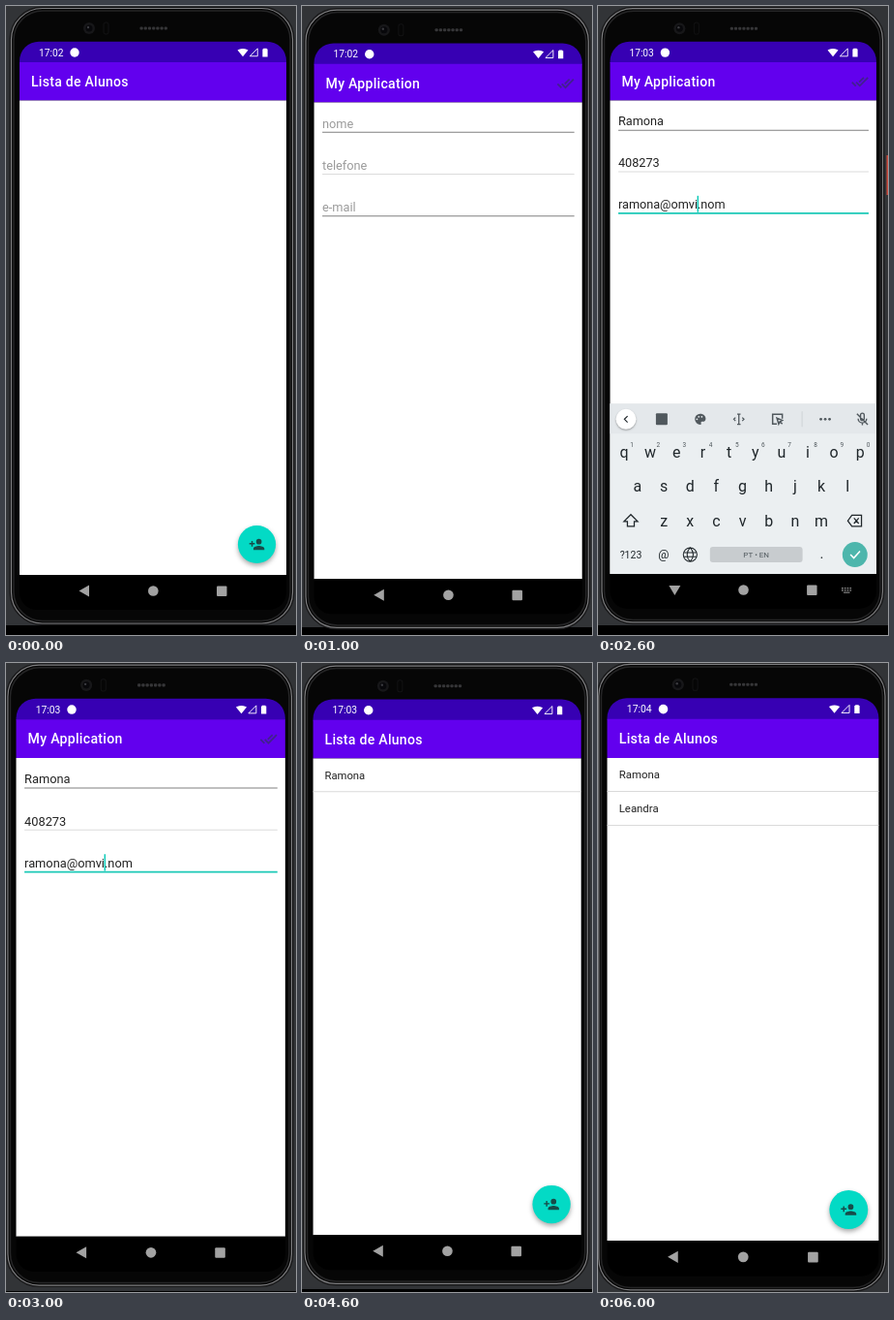
Animation of 300x649 px, one loop 7000 ms. Source, as an HTML page with a canvas:

```html
<!DOCTYPE html>
<html lang="pt">
<head>
<meta charset="utf-8">
<style>
html, body { margin: 0; height: 100%; overflow: hidden; background: #000; }
canvas { display: block; width: 300px; height: 649px; }
</style>
</head>
<body>
<canvas id="stage"></canvas>
<script>
const canvas = document.getElementById('stage');
const ctx = canvas.getContext('2d');
const ratio = window.devicePixelRatio || 1;
canvas.width = 300 * ratio;
canvas.height = 649 * ratio;

// left/top: corner of the page below the app bar; floor: where the desktop turns black
const scenes = [
  { left: 14, top: 97, scale: 1, floor: 639, time: '17:02', names: [] },
  { left: 12.5, top: 99, scale: 1.0045, floor: 641, time: '17:02' },
  { left: 12.5, top: 97, scale: .998, floor: 639, time: '17:03', filled: true, keyboard: true },
  { left: 10.5, top: 97.5, scale: 1.0085, floor: 648, time: '17:03', filled: true },
  { left: 11.5, top: 98, scale: 1.0045, floor: 646, time: '17:03', names: ['Ramona'] },
  { left: 13.5, top: 100, scale: .998, floor: 643, time: '17:04', names: ['Ramona', 'Leandra', 'Bruno'], menu: true },
  { left: 9.5, top: 97.5, scale: 1.0175, floor: 649, time: '17:04', names: ['Ramona', 'Leandra'] },
];
const hints = ['nome', 'telefone', 'e-mail'];
const values = ['Ramona', '408273', 'ramona@omvi.nom'];

const icons = {
  addPerson: 'M15 12a4 4 0 1 0 0-8 4 4 0 0 0 0 8zM6 10V7H4v3H1v2h3v3h2v-3h3v-2zM15 14c-2.7 0-8 1.3-8 4v2h16v-2c0-2.7-5.3-4-8-4z',
  wifi: 'M12 21 24 6.5C23.5 6 18.8 3 12 3S.5 6 0 6.5z',
  signal: 'M2 21H21V2z',
  battery: 'M8 4V2h8v2h2v18H6V4z',
  check: 'M4 12l6 6L21 6',
  doubleCheck: 'M1 12.7l5.3 5.3M6.8 12.7l5 5L23 6.3M17.3 6.3l-6.4 6.3',
  chevron: 'M15 6l-6 6 6 6',
  palette: 'M12 3a9 9 0 0 0 0 18c1 0 1.8-1 1.4-2-.8-1.4 0-3 1.6-3h1a5 5 0 0 0 5-5c0-4.4-4-8-9-8zM5 12a1.5 1.5 0 1 0 3 0 1.5 1.5 0 1 0-3 0M8 8a1.5 1.5 0 1 0 3 0 1.5 1.5 0 1 0-3 0M13 8a1.5 1.5 0 1 0 3 0 1.5 1.5 0 1 0-3 0',
  textCursor: 'M9 3h6M12 3v18M9 21h6M6 9l-3 3 3 3M18 9l3 3-3 3',
  touch: 'M20 11V4H4v16h7M11 10l9 4-4 2-2 4zM16 16l4 4',
  mic: 'M9 5a3 3 0 0 1 6 0v6a3 3 0 0 1-6 0zM5 11a7 7 0 0 0 14 0M12 18v4M3 3l18 18',
  shift: 'M12 3 2 13h5v7h10v-7h5z',
  erase: 'M8 4h14v16H8L2 12zM11 8l7 8M18 8l-7 8',
  globe: 'M2 12a10 10 0 1 0 20 0 10 10 0 1 0-20 0M2.5 9h19M2.5 15h19M12 2c-6 6-6 14 0 20M12 2c6 6 6 14 0 20',
};
for (const key in icons) icons[key] = new Path2D(icons[key]);

function rect(x, y, w, h, color, radius = 0) {
  ctx.fillStyle = color;
  ctx.beginPath();
  ctx.roundRect(x, y, w, h, radius);
  ctx.fill();
}

function outline(x, y, w, h, color, radius, width = 1) {
  ctx.strokeStyle = color;
  ctx.lineWidth = width;
  ctx.beginPath();
  ctx.roundRect(x, y, w, h, radius);
  ctx.stroke();
}

const circle = (x, y, r, color) => rect(x - r, y - r, 2 * r, 2 * r, color, r);

function polygon(color, ...points) {
  ctx.fillStyle = color;
  ctx.beginPath();
  for (const [x, y] of points) ctx.lineTo(x, y);
  ctx.fill();
}

// y is the middle of the capitals
function text(string, x, y, size, color, { weight = 400, align = 'left', spacing = 0 } = {}) {
  ctx.font = `${weight} ${size}px Roboto, sans-serif`;
  ctx.letterSpacing = spacing + 'px';
  ctx.textAlign = align;
  ctx.fillStyle = color;
  ctx.fillText(string, x, y + size * .355);
}

// icons live on a 24-unit grid; a line width makes them outlined
function icon(name, x, y, size, color, line) {
  ctx.save();
  ctx.translate(x - size / 2, y - size / 2);
  ctx.scale(size / 24, size / 24);
  ctx.fillStyle = ctx.strokeStyle = color;
  ctx.lineWidth = line;
  if (line) ctx.stroke(icons[name]);
  else ctx.fill(icons[name], 'evenodd');
  ctx.restore();
}

function shadowed(blur, offset, draw) {
  ctx.save();
  ctx.shadowColor = 'rgba(0,0,0,.35)';
  ctx.shadowBlur = blur * ratio;
  ctx.shadowOffsetY = offset * ratio;
  draw();
  ctx.restore();
}

function drawPhone(scene) {
  rect(4.5, 1.5, 293, 636.5, '#060606', 33);
  outline(4.5, 1.5, 293, 636.5, '#19191a', 33, 2);
  outline(5.5, 2.5, 291, 634.5, '#7c7c7e', 32, 1.2);
  outline(8, 5, 286, 629.5, '#242425', 30, 1.5);
  circle(86, 23, 6, '#171719');
  circle(86, 23, 3.5, '#08080b');
  circle(85, 22, 1.2, '#3c3c41');
  outline(101, 17, 5, 12, '#131314', 2);
  for (let i = 0; i < 7; i++) rect(138.5 + i * 4.2, 21.5, 3.2, 3, '#363638', 1);

  rect(14, 36.7, 276, 22, '#3700b3', [20, 20, 0, 0]);
  rect(14, 58, 276, 39.5, '#6200ee');
  rect(14, 97.5, 276, 489.5, '#fff');
  rect(14, 587, 276, 36, '#000', [0, 0, 18, 18]);
  text(scene.time, 34, 48, 10.2, '#fff');
  circle(71, 48, 4.7, '#fff');
  icon('wifi', 245, 48, 11, '#fff');
  icon('signal', 256.5, 48, 10, '#fff', 2.2);
  icon('battery', 268, 48, 10.5, '#fff');

  const grey = '#a2a2a2';
  if (scene.keyboard) {
    polygon(grey, [75, 599], [87, 599], [81, 609]);
    for (let i = 0; i < 4; i++) {
      rect(254 + i * 2.8, 601, 1.7, 1.4, '#858585');
      rect(254 + i * 2.8, 603.3, 1.7, 1.4, '#858585');
    }
    rect(256, 605.6, 6.5, 1.2, '#858585');
  } else {
    polygon(grey, [75.5, 603.5], [86, 597.5], [86, 609.5]);
  }
  circle(152.3, 603.5, 5.3, grey);
  rect(218, 598.5, 10.5, 10.5, grey, 1);
}

function drawTitle(string) {
  text(string, 26, 78, 14, '#fff', { weight: 500, spacing: .27 });
}

function drawList({ names, menu }) {
  drawTitle('Lista de Alunos');
  names.forEach((name, i) => {
    const y = 97 + i * 34.4;
    text(name, 26, y + 17.6, 11.2, '#222');
    rect(14, y + 34, 276, 1, i === 2 ? '#ececec' : '#dadada');
  });
  shadowed(5, 2.5, () => circle(259.5, 555.5, 19.6, '#03dac5'));
  icon('addPerson', 259.5, 555.5, 17, '#174c49');
  if (!menu) return;
  ctx.save();
  ctx.beginPath();
  ctx.rect(14, 97, 276, 490);
  ctx.clip();
  shadowed(6, 2, () => rect(151.7, 188.5, 142, 46, '#fff', 2));
  ctx.restore();
  text('remove', 163.7, 212, 11.2, '#222');
}

function drawForm({ filled }) {
  drawTitle('My Application');
  icon('doubleCheck', 273, 78, 18, '#42208f', 2.4);
  hints.forEach((hint, i) => {
    const y = 97 + i * 43;
    const focused = filled && i === 2;
    text(filled ? values[i] : hint, 22.5, y + 22, 12.7, filled ? '#222' : '#9b9b9b');
    rect(22.5, y + (focused ? 30.2 : 30.7), 259.5, focused ? 1.9 : 1,
      focused ? '#1cc9b7' : i === 1 ? '#dcdcdc' : '#808080');
  });
  if (filled) rect(104.3, 196, 1.4, 17, '#03c9b6');
}

function drawKeyboard() {
  const ink = '#20272b', soft = '#50585d';
  const center = { align: 'center' };
  ctx.save();
  ctx.translate(1.5, 1);
  rect(12.5, 410, 276, 176, '#ebeff1');
  rect(12.5, 410, 276, 31, '#e4e8eb');
  shadowed(2, 1, () => circle(29, 426, 10.5, '#fff'));
  icon('chevron', 29, 426, 13, ink, 2.2);
  rect(60, 420, 12, 12, soft, 1);
  icon('palette', 106, 426, 15, soft);
  icon('textCursor', 146, 426, 14, soft, 2.2);
  icon('touch', 186, 426, 15, soft, 2.4);
  rect(211, 418, 1, 16, '#cdd2d5');
  for (let i = 0; i < 3; i++) circle(231 + i * 4.5, 426, 1.4, soft);
  icon('mic', 274, 426, 15, soft, 2.2);

  [['qwertyuiop', 27, 460], ['asdfghjkl', 41, 495], ['zxcvbnm', 68.2, 531]].forEach(([row, x, y]) => {
    [...row].forEach((letter, i) => text(letter, x + i * 27.2, y, 16, ink, center));
  });
  [...'1234567890'].forEach((digit, i) => text(digit, 35.2 + i * 27.2, 452, 6.5, soft, center));
  icon('shift', 34, 531, 17, ink, 1.8);
  icon('erase', 266, 531, 17, ink, 1.8);

  text('?123', 34, 566, 10.5, ink, center);
  text('@', 68, 566, 12.5, ink, center);
  icon('globe', 95.5, 566, 17, ink, 1.5);
  rect(116, 558, 96, 16, '#c8cccf', 3);
  text('PT • EN', 164, 566, 8, soft, center);
  text('.', 232, 565, 15, ink, center);
  circle(266.3, 566, 13, '#4db6ac');
  icon('check', 266.3, 566, 14, '#fff', 2.6);
  ctx.restore();
}

function draw() {
  const scene = scenes[Math.floor(performance.now() / 1000) % scenes.length];
  ctx.setTransform(ratio, 0, 0, ratio, 0, 0);
  rect(0, 0, 300, 649, '#000');
  rect(0, 0, 300, scene.floor, '#323437');
  if (scene.keyboard) rect(298.5, 154, 1.5, 41, '#c8483c');
  ctx.translate(scene.left, scene.top);
  ctx.scale(scene.scale, scene.scale);
  ctx.translate(-14, -97);
  drawPhone(scene);
  if (scene.names) drawList(scene);
  else drawForm(scene);
  if (scene.keyboard) drawKeyboard();
  requestAnimationFrame(draw);
}
draw();
</script>
</body>
</html>
```
